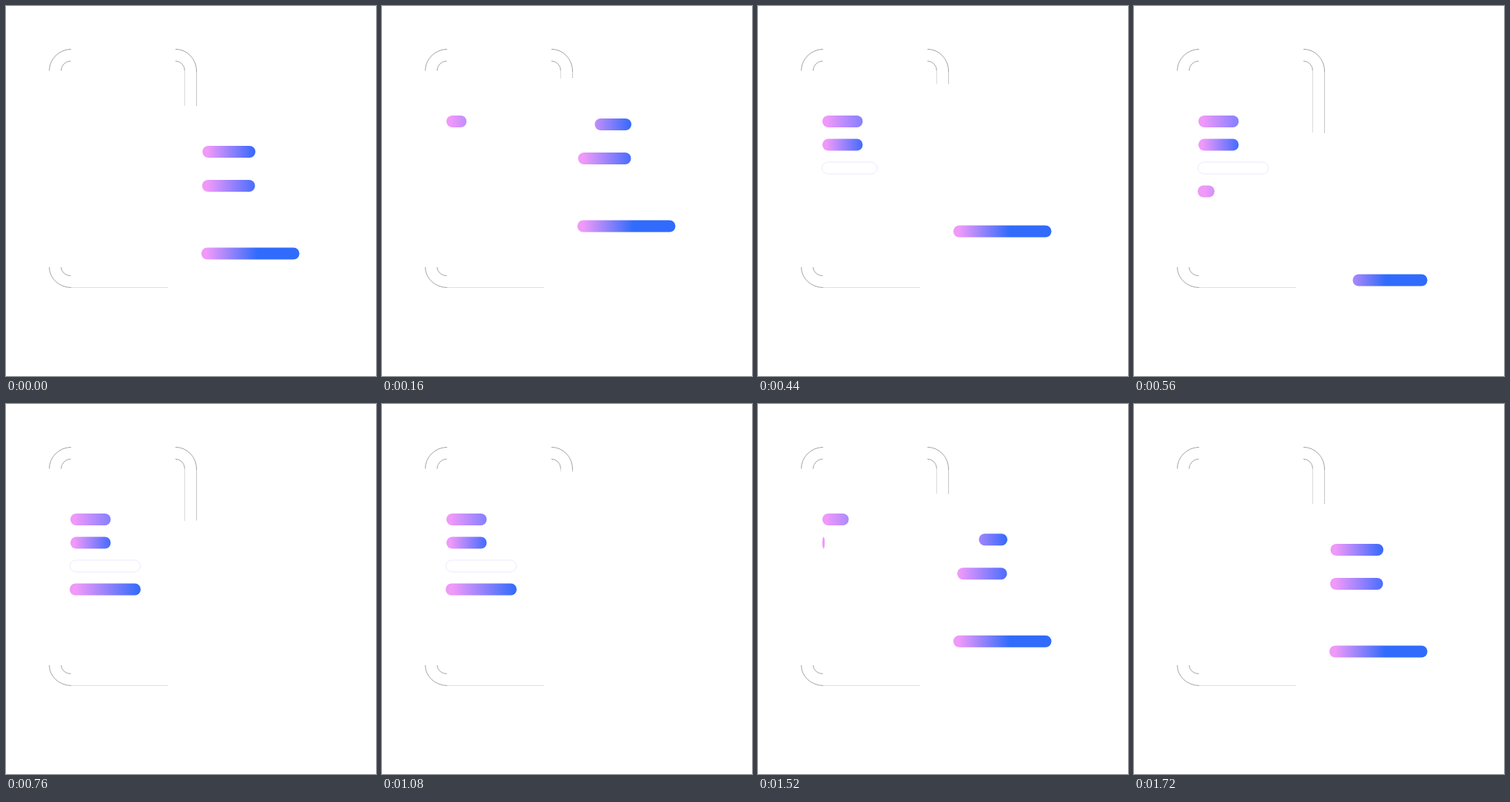
Recreate the animation shown at these times as an HTML page. Size 500 by 500 pixels, loop 2 s.

```html
<!DOCTYPE html>
<html lang="en">
<head>
<meta charset="utf-8">
<title>Document transfer</title>
<style>
html, body { margin: 0; width: 100%; height: 100%; overflow: hidden; background: #fff; }
svg { display: block; width: 100%; height: 100%; }
</style>
</head>
<body>
<svg viewBox="0 0 500 500">
  <defs>
    <clipPath id="edge"><rect id="cover" x="228" y="50" width="40" height="85"/></clipPath>
  </defs>
  <g fill="none" stroke="#8c8c8c" stroke-width=".8">
    <path d="M58.5 87.5A30 29 0 0 1 88 58.4M74.5 87.5A13 13 0 0 1 87.5 74.4"/>
    <path d="M58.5 353A30 27.5 0 0 0 88 380.5M74.5 353A13 12 0 0 0 87.5 364.6"/>
    <path d="M88 380.5H219" stroke="#d8d8d8"/>
    <g clip-path="url(#edge)">
      <path d="M229 58.4A28.5 29.5 0 0 1 257.5 88M229 74.4A12.5 13 0 0 1 241.5 87.5"/>
      <path d="M241.5 88V200" stroke="#d2d2d2"/>
      <path d="M257.5 88V200" stroke-width="1" stroke-dasharray="1 1"/>
    </g>
  </g>
  <g id="bars"></g>
</svg>
<script>
const NS = 'http://www.w3.org/2000/svg';
const LOOP = 2000, END = 1720, STEP = 40;
const PINK = '#ef99f9', BLUE = '#306bfb';

// Vertical sway of the right-hand panel: [time, offset]
const SWAY = [
  [0, 0], [160, -37], [320, -56], [440, -30], [560, 36], [620, 42], [760, 23],
  [1010, -58], [1080, -44], [1320, 23], [1350, 26], [1680, -50]
];

// x, y, width, end colour, gradient length, then the time span of the move
const LEFT = [
  { x: 87, y: 148, w: 54.5, to: '#8580ff', g: 54, span: [30, 290] },
  { x: 87, y: 179.5, w: 54.5, to: '#466bff', g: 54, span: [190, 360] },
  { x: 86.5, y: 211, w: 95, span: [302, 478] },
  { x: 86, y: 242.5, w: 96, to: BLUE, g: 96, span: [535, 640] }
];
const RIGHT = [
  { x: 265.5, y: 189, w: 71.5, to: '#3569fd', g: 71, span: [80, 340] },
  { x: 265, y: 235, w: 71.5, to: '#4b6dff', g: 71, span: [190, 360] },
  { x: 264, y: 326.5, w: 132.5, to: BLUE, g: 76, span: [535, 640] }
];

function add(parent, tag, attrs) {
  const el = document.createElementNS(NS, tag);
  for (const k in attrs) el.setAttribute(k, attrs[k]);
  parent.appendChild(el);
  return el;
}

const defs = document.querySelector('defs');
const layer = document.getElementById('bars');
const cover = document.getElementById('cover');

function makeBar(bar, id) {
  const shape = { x: bar.x, y: bar.y, width: bar.w, height: 16, rx: 8 };
  if (bar.to) {
    const grad = add(defs, 'linearGradient', {
      id, gradientUnits: 'userSpaceOnUse', x1: bar.x, x2: bar.x + bar.g, y1: 0, y2: 0
    });
    add(grad, 'stop', { offset: 0.1, 'stop-color': PINK });
    add(grad, 'stop', { offset: 1, 'stop-color': bar.to });
    shape.fill = `url(#${id})`;
  } else {
    Object.assign(shape, { fill: '#fff', stroke: '#e6e4ff', 'stroke-width': 0.8 });
  }
  bar.el = add(layer, 'rect', shape);
}

LEFT.forEach((b, i) => makeBar(b, 'left' + i));
RIGHT.forEach((b, i) => makeBar(b, 'right' + i));

const progress = (t, [a, b]) => Math.min(1, Math.max(0, (t - a) / (b - a)));

function slope(i) {
  const a = SWAY[i - 1], b = SWAY[i], c = SWAY[i + 1];
  if (!a || !c) return 0;
  const before = (b[1] - a[1]) / (b[0] - a[0]);
  const after = (c[1] - b[1]) / (c[0] - b[0]);
  return before * after <= 0 ? 0 : 2 * before * after / (before + after);
}

// Smooth curve that does not overshoot its points
function sway(t) {
  if (t >= END) return 0;
  let i = 0;
  while (i < SWAY.length - 2 && t > SWAY[i + 1][0]) i++;
  const [t0, y0] = SWAY[i], [t1, y1] = SWAY[i + 1];
  const d = t1 - t0, u = Math.min(1, (t - t0) / d), v = 1 - u;
  const m0 = i ? slope(i) : (y1 - y0) / d;
  return y0 * (1 + 2 * u) * v * v + y1 * u * u * (3 - 2 * u)
    + d * u * v * (m0 * v - slope(i + 1) * u);
}

function resize(bar, x, w) {
  bar.el.setAttribute('x', x);
  bar.el.setAttribute('width', w);
  bar.el.setAttribute('visibility', w > 0.5 ? 'visible' : 'hidden');
}

function draw(time) {
  const t = Math.floor((time % LOOP) / STEP) * STEP;
  const phase = t >= END ? 0 : Math.min(t, END - t);
  const dy = sway(t);
  cover.setAttribute('height', 85 + dy);
  for (const b of LEFT) resize(b, b.x, b.w * progress(phase, b.span));
  for (const b of RIGHT) {
    const gone = b.w * progress(phase, b.span);
    resize(b, b.x + gone, b.w - gone);
    b.el.setAttribute('y', b.y + dy);
  }
}

const start = performance.now();
function tick() {
  draw(performance.now() - start);
  requestAnimationFrame(tick);
}
tick();
</script>
</body>
</html>
```
